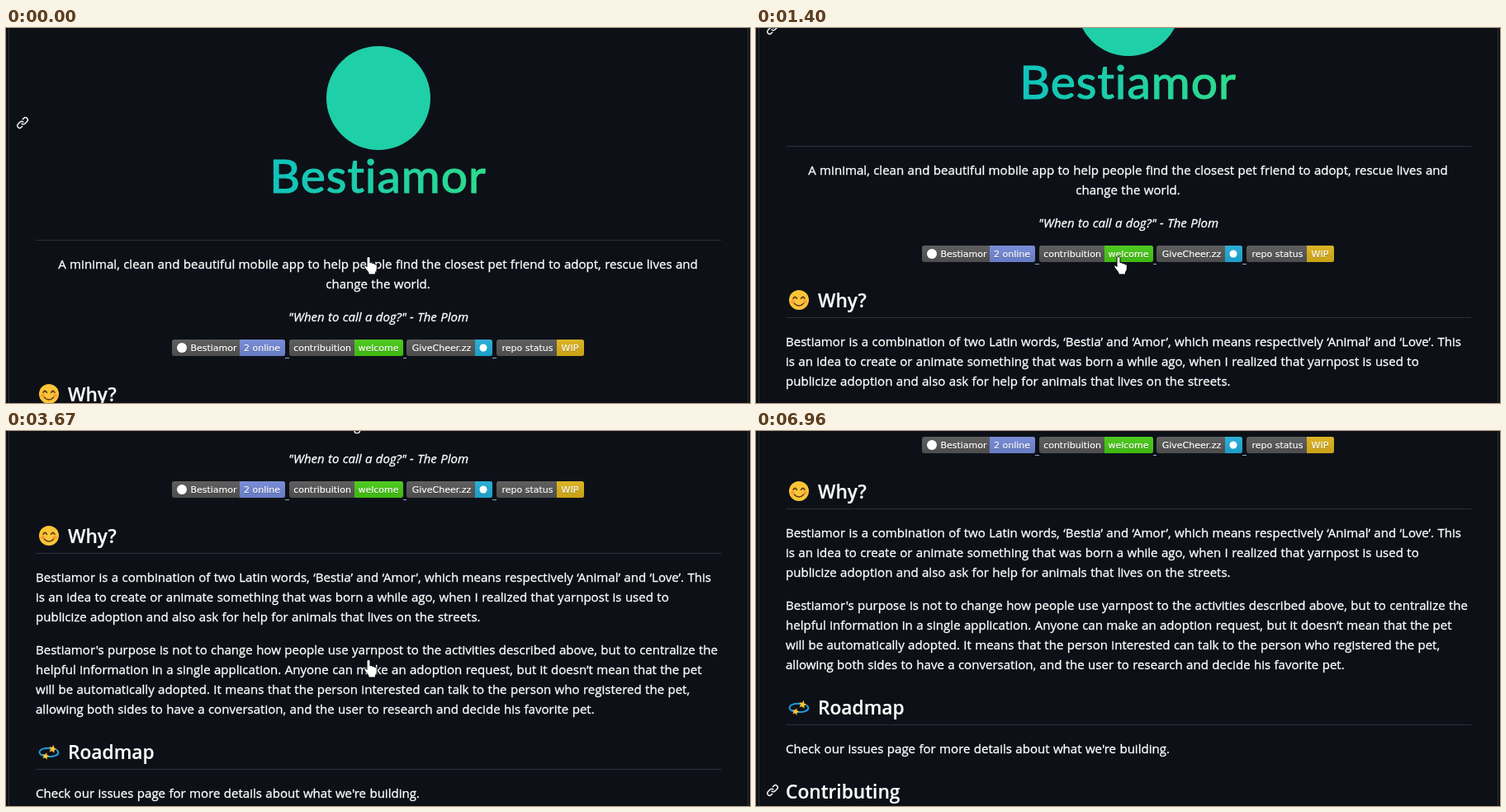
An HTML page that plays this animation: 901 px wide and 455 px high, repeating every 7.71 s.

```html
<!DOCTYPE html>
<html lang="en">
<head>
<meta charset="utf-8">
<title>Readme scroll</title>
<style>
  html, body { margin: 0; width: 100%; height: 100%; overflow: hidden; background: #0d1117; }
  svg { display: block; width: 100%; height: 100%; }
  text { fill: #fff; white-space: pre; }
  .body { font: 15.05px "Open Sans", "Noto Sans", sans-serif; word-spacing: .45px;
          stroke: #fff; stroke-width: .3; }
  .head { font: 600 22.7px "Open Sans", "Noto Sans", sans-serif; stroke: #fff; stroke-width: .2; }
  .mid { text-anchor: middle; }
  .slant { font-style: italic; }
  .badge { font: 11px "DejaVu Sans", sans-serif; text-anchor: middle; stroke: #fff; stroke-width: .2; }
  .badge.shade { fill: #010101; fill-opacity: .3; stroke: none; }
  .brand { font: 57px Lato, sans-serif; letter-spacing: 1px; text-anchor: middle;
           fill: url(#tint); stroke: url(#tint); stroke-width: 1.2; stroke-linejoin: round; }
  .link { fill: none; stroke: #f0f6fc; stroke-width: 1.5; stroke-linecap: round; }
</style>
</head>
<body>
<svg viewBox="0 0 901 455" xmlns="http://www.w3.org/2000/svg">
  <defs>
    <linearGradient id="tint">
      <stop offset="0" stop-color="#10c3bd"/>
      <stop offset="1" stop-color="#2fdc8c"/>
    </linearGradient>
    <linearGradient id="gloss" x2="0" y2="1">
      <stop offset="0" stop-color="#bbb" stop-opacity=".1"/>
      <stop offset="1" stop-opacity=".1"/>
    </linearGradient>
    <path id="chain" class="link" d="M8.3 3.8 9.55 2.55a2.75 2.75 0 0 1 3.9 3.9l-2.5 2.5a2.75 2.75 0 0 1-3.9 0
      M7.7 12.2 6.45 13.45a2.75 2.75 0 0 1-3.9-3.9l2.5-2.5a2.75 2.75 0 0 1 3.9 0"/>
  </defs>
  <rect width="901" height="455" fill="#0d1117"/>
  <path d="M3.5 0V455M898.5 0V455" stroke="#2b3138"/>

  <g id="page">
    <use href="#chain" x="12" y="107"/>
    <use id="anchor" href="#chain" x="12" y="799"/>
    <circle cx="451" cy="85" r="63" fill="#1fcfa8"/>
    <text class="brand" x="450.5" y="199.5">Bestiamor</text>
    <path d="M36 257.5H866M36 465.5H866M36 727.5H866" stroke="#2b3138"/>
    <g id="badges"></g>
    <path d="M338 400.5h5M481 400.5h4M589 400.5h5" stroke="#86a9cc"/>
    <g id="copy"></g>

    <g transform="translate(52 444)" fill="none" stroke-linecap="round">
      <circle r="12" fill="#fcc537"/>
      <g fill="#f99a3c">
        <ellipse cx="-7.6" cy="2" rx="2.6" ry="2"/>
        <ellipse cx="7.6" cy="2" rx="2.6" ry="2"/>
      </g>
      <path d="M-7-1.6q2.2-4 4.4 0M2.6-1.6q2.2-4 4.4 0M-5.6 4.2q5.6 5.6 11.2 0" stroke="#5c3a1c" stroke-width="1.6"/>
    </g>

    <g transform="translate(52 707)">
      <path d="M3-4.6C-5-6.4-11.6-3.6-11.4 0c.1 2 2.4 3.4 5 4.2M-1 5C6 5.6 11.6 3.2 11.4 0c-.1-1.2-.8-2-2-2.8"
        fill="none" stroke="#1f9ce0" stroke-width="2" stroke-linecap="round"/>
      <path id="starA" fill="#fcc537"/>
      <path id="starB" fill="#fcc537"/>
    </g>
  </g>

  <path id="hand" fill="#fff" stroke="#000" d="M6 .5C7.3.5 8 1.3 8 2.5V8c1-1 3-.6 3 1 1-1 2.7-.4 2.8 1
    1.2-.6 2.5 0 2.5 1.5V15c0 2-1.3 3-1.8 4.5V22H6v-2C5 18 2 15 .8 12.8.2 11.4 2 10.3 3.2 11.6l.8 1V2.5C4 1.3 4.7.5 6 .5Z"/>
  <path id="beam" fill="none" stroke="#fff" d="M-3-7.5H-1L0-6.5 1-7.5H3M0-6.5V6.5M-3 7.5H-1L0 6.5 1 7.5H3"/>
</svg>

<script>
const LOOP = 7710;
const $ = id => document.getElementById(id);

// class, x, baseline, text
const copy = [
  ["body mid", 450.5, 292, "A minimal, clean and beautiful mobile app to help people find the closest pet friend to adopt, rescue lives and"],
  ["body mid", 450.5, 316, "change the world."],
  ["body mid slant", 451, 356, "\"When to call a dog?\" - The Plom"],
  ["head", 75, 453, "Why?"],
  ["body", 36, 500, "Bestiamor is a combination of two Latin words, ‘Bestia’ and ‘Amor’, which means respectively ‘Animal’ and ‘Love’. This"],
  ["body", 36, 524, "is an idea to create or animate something that was born a while ago, when I realized that yarnpost is used to"],
  ["body", 36, 548, "publicize adoption and also ask for help for animals that lives on the streets."],
  ["body", 36, 588, "Bestiamor's purpose is not to change how people use yarnpost to the activities described above, but to centralize the"],
  ["body", 36, 612, "helpful information in a single application. Anyone can make an adoption request, but it doesn’t mean that the pet"],
  ["body", 36, 636, "will be automatically adopted. It means that the person interested can talk to the person who registered the pet,"],
  ["body", 36, 660, "allowing both sides to have a conversation, and the user to research and decide his favorite pet."],
  ["head", 75, 715, "Roadmap"],
  ["body", 36, 762, "Check our issues page for more details about what we're building."],
  ["head", 36, 817, "Contributing"]
];

const text = (cls, x, y, s) => `<text class="${cls}" x="${x}" y="${y}">${s}</text>`;
$("copy").innerHTML = copy.map(row => text(...row)).join("");

const dot = (x, r) => `<circle cx="${x}" cy="388" r="${r}" fill="#fff"/>`;
const label = (x, s) => text("badge shade", x, 393, s) + text("badge", x, 392, s);

function badge(x, split, end, color, left, right) {
  const box = fill => `<rect x="${x}" y="378" width="${end - x}" height="20" rx="3" fill="${fill}"/>`;
  return box("#555") +
    `<path d="M${split} 378H${end - 3}q3 0 3 3v14q0 3-3 3H${split}z" fill="${color}"/>` +
    box("url(#gloss)") + left + right;
}

$("badges").innerHTML =
  badge(201, 283, 338, "#7289da", dot(213, 6) + label(251.5, "Bestiamor"), label(310, "2 online")) +
  badge(343, 422, 481, "#4c1", label(383, "contribuition"), label(451, "welcome")) +
  badge(485, 568, 589, "#1eaedb", label(527.5, "GiveCheer.zz"), dot(578, 4.5)) +
  badge(594, 667, 700, "#dfb317", label(631.5, "repo status"), label(683, "WIP"));

function star(cx, cy, r) {
  const points = Array.from({ length: 10 }, (_, i) => {
    const a = i * Math.PI / 5 - 1.3, d = i % 2 ? r * .45 : r;
    return (cx + d * Math.cos(a)).toFixed(2) + " " + (cy + d * Math.sin(a)).toFixed(2);
  });
  return "M" + points.join("L") + "Z";
}
$("starA").setAttribute("d", star(4.5, -4, 5.2));
$("starB").setAttribute("d", star(-4, 4.5, 4.6));

// [time, scroll offset]: wheel notches, each held until the next
const scroll = [
  [0, 0], [500, 3], [570, 13], [760, 100],
  [1400, 114], [1470, 152], [1530, 187], [1600, 200],
  [2520, 300],
  [3670, 317], [3740, 342], [3810, 362], [3880, 371]
];

const mix = (a, b, q) => a + (b - a) * q;
const tick = (t, from, to) => Math.max(0, Math.min(7, Math.floor((t - from) / (to - from) * 7 + 1e-6)));

function pointer(t) {
  if (t < 5880) return { x: 439, y: 277, hand: true };
  if (t < 6520) {
    const k = tick(t, 5880, 6360);
    return { x: mix(448, 708, k / 7), y: mix(283, 376, k / 7), hand: k < 2 };
  }
  const q = (tick(t, 6520, 6960) + 1) / 8;
  return { x: mix(708, 856, q), y: mix(376, 470, q), hand: false };
}

function place(el, x, y, shown) {
  el.setAttribute("transform", `translate(${x} ${y})`);
  el.setAttribute("visibility", shown ? "visible" : "hidden");
}

function draw(t) {
  const offset = scroll.filter(([at]) => at <= t).pop()[1];
  const p = pointer(t);
  place($("page"), 0, -offset, true);
  place($("hand"), p.x - 6, p.y, p.hand);
  place($("beam"), Math.round(p.x) + .5, Math.round(p.y), !p.hand);
  $("anchor").style.display = p.y > 418 ? "" : "none";
}

function loop() {
  draw(performance.now() % LOOP);
  requestAnimationFrame(loop);
}
loop();
</script>
</body>
</html>
```
